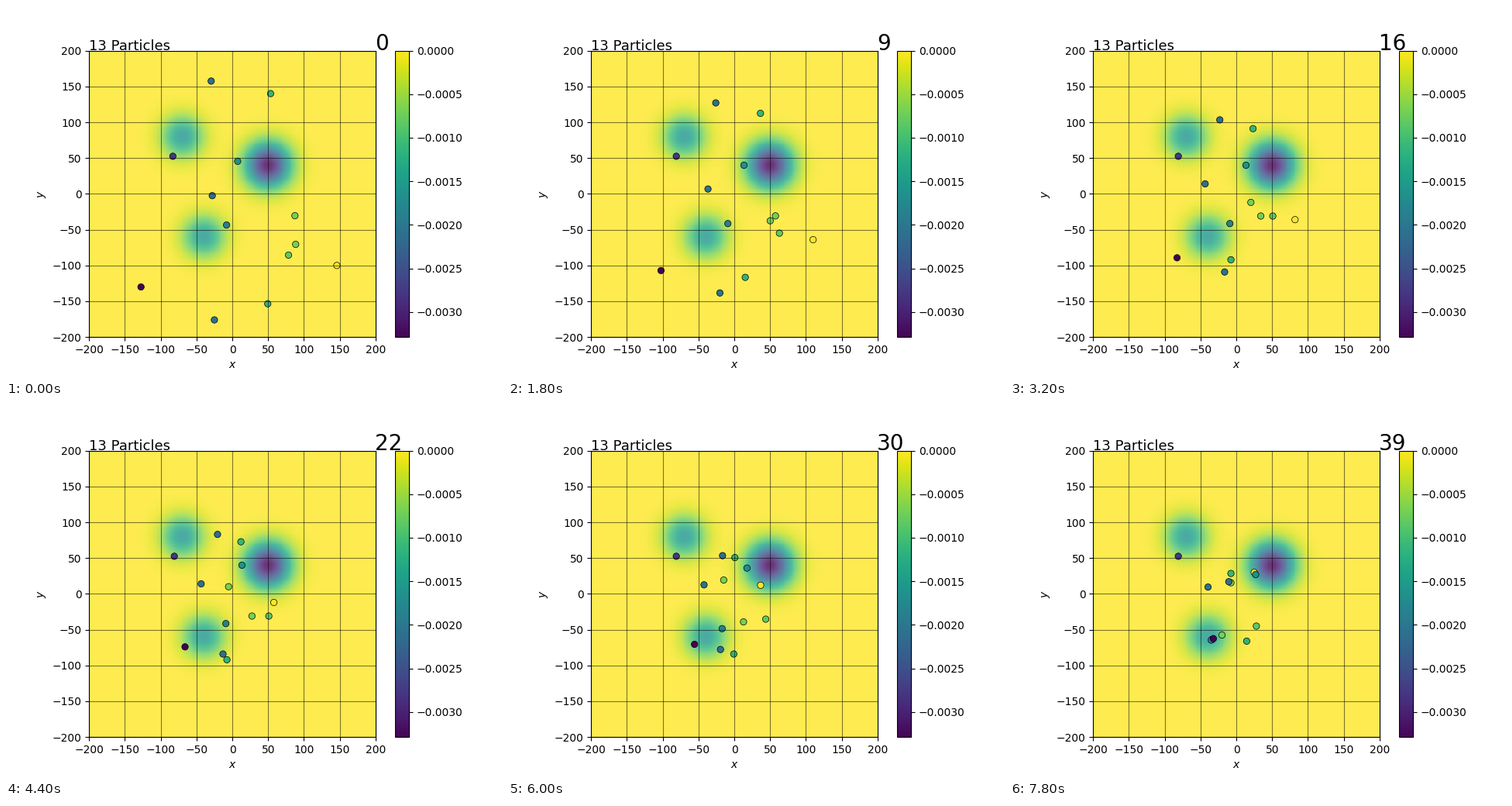
Write a matplotlib script that moves like this. It is 640 px wide and 480 px high and loops after 8 s.

```python
import numpy as np
import matplotlib.pyplot as plt
from matplotlib.animation import FuncAnimation

FRAMES, STEP_MS = 40, 200
LAST = FRAMES - 1
LEAVE = 26  # step at which all particles set off from their stop
SIZE = 200
WELLS = [(50, 40, 10, 22), (-70, 80, 4, 20), (-40, -60, 4, 20)]  # x, y, strength, sigma

# One row per particle: start, step of arrival, stop, end
PARTICLES = np.array([
    (87.5, -30.5, 18, 27.5, -31, -20, -57.5),
    (88.5, -70.5, 25, -18, 21, -7.5, 15.5),
    (78.5, -85.5, 16, 51, -31, 28, -45),
    (146, -100, 26, 42, 4, 25, 30),
    (-25, -176, 22, -13, -84, -33.5, -63.5),
    (49.5, -153.5, 15, -7.5, -92, 14.5, -66),
    (-8, -43.5, 1, -9, -41.5, -35, -64.5),
    (-127.5, -130, 22, -66, -74, -32, -62.5),
    (53.5, 140, 26, 4.5, 60.5, -7.5, 28.5),
    (7.5, 45.5, 2, 13.5, 40, 27, 27),
    (-29.5, 157.5, 26, -19, 69.5, -10.5, 17),
    (-28, -2.5, 16, -43.5, 14, -39.5, 9.5),
    (-83, 52.5, 1, -81, 52.5, -81, 52.5),
])
START, STOP, END = PARTICLES[:, :2], PARTICLES[:, 3:5], PARTICLES[:, 5:]
ARRIVE = PARTICLES[:, 2:3]


def positions(step):
    inward = np.clip(step / ARRIVE, 0, 1)
    onward = np.clip((step - LEAVE) / (LAST - LEAVE), 0, 1)
    return START + (STOP - START) * inward + (END - STOP) * onward


def potential(n=201):
    axis = np.linspace(-SIZE, SIZE, n)
    x, y = np.meshgrid(axis, axis)
    total = np.zeros_like(x)
    for cx, cy, strength, sigma in WELLS:
        r2 = (x - cx) ** 2 + (y - cy) ** 2
        total -= strength * np.exp(-r2 / (2 * sigma**2)) / (2 * np.pi * sigma**2)
    return total


fig, ax = plt.subplots(figsize=(6.4, 4.8), dpi=100)
field = ax.imshow(potential(), extent=(-SIZE, SIZE, -SIZE, SIZE), origin="lower",
                  cmap="viridis", alpha=0.8, vmax=0, interpolation="nearest")
bar = fig.colorbar(field, ax=ax)
# Thin edges make the translucent bands overlap into fine stripes
bar.solids.set(edgecolor="face", linewidth=0.25)

dots = ax.scatter(*START.T, c=START[:, 0], cmap="viridis",
                  edgecolors="black", linewidths=0.5)
ticks = np.arange(-SIZE, SIZE + 1, 50)
ax.set(xlim=(-SIZE, SIZE), ylim=(-SIZE, SIZE), xticks=ticks, yticks=ticks,
       xlabel="$x$", ylabel="$y$")
ax.grid(color="black", linewidth=0.8, alpha=0.5)
ax.text(-SIZE, SIZE + 1, f"{len(PARTICLES)} Particles", fontsize=13)
counter = ax.text(SIZE - 1, SIZE + 1, "0", fontsize=20)


def update(step):
    dots.set_offsets(positions(step))
    counter.set_text(str(step))
    return dots, counter


anim = FuncAnimation(fig, update, frames=FRAMES, interval=STEP_MS,
                     repeat=True, repeat_delay=0)
plt.show()
```
